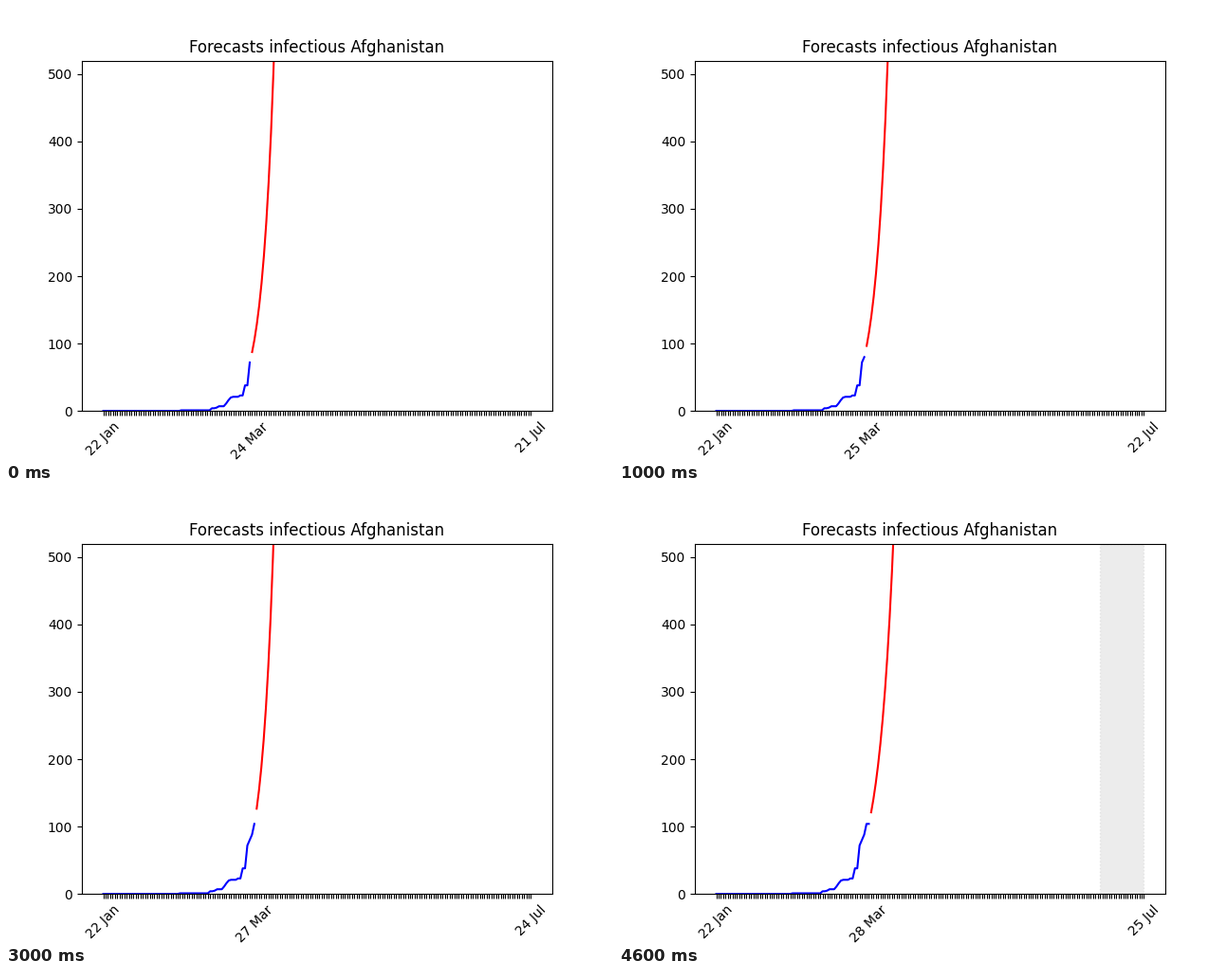
Write a matplotlib script that moves like this. It is 640x480 px and loops after 5 s.

```python
import matplotlib.pyplot as plt
import numpy as np
from matplotlib.animation import FuncAnimation

FIRST_DAY = 62           # 24 March, counted from 22 January
HORIZON = 119            # days forecast after the last observation
Y_MAX = 520
LOCKDOWN_DAYS = 19

# Active cases per day: a long quiet stretch, then the rise from 8 March.
CASES = np.array([0] * 33 + [1] * 13
                 + [4, 4, 5, 7, 7, 7, 11, 16, 20, 21, 21, 21, 23, 23,
                    38, 38, 72, 80, 88, 104, 104])

# Fitted daily growth rate for each forecast date.
GROWTH = [0.194, 0.188, 0.190, 0.196, 0.1525]

fig, ax = plt.subplots(figsize=(6.4, 4.8), dpi=100)


def draw(step):
    today = FIRST_DAY + step
    last = today + HORIZON
    ax.clear()

    days = np.arange(today + 1)
    ax.plot(days, CASES[:today + 1], color="blue")

    ahead = np.arange(1, 31)
    ax.plot(today + ahead, CASES[today] * np.exp(GROWTH[step] * ahead),
            color="red")

    if step == len(GROWTH) - 1:
        ax.axvspan(last - LOCKDOWN_DAYS, last, color="gray", alpha=0.15,
                   linestyle=":")

    labels = [""] * (last + 1)
    labels[0] = "22 Jan"
    labels[today] = f"{24 + step} Mar"
    labels[last] = f"{21 + step} Jul"
    ax.set_xticks(range(last + 1), labels, rotation=45)
    ax.set_xlim(-0.05 * last, 1.05 * last)
    ax.set_ylim(0, Y_MAX)
    ax.set_title("Forecasts infectious Afghanistan")
    return []


anim = FuncAnimation(fig, draw, frames=len(GROWTH), init_func=lambda: draw(0),
                     interval=1000, repeat=True, repeat_delay=0)
plt.show()
```
